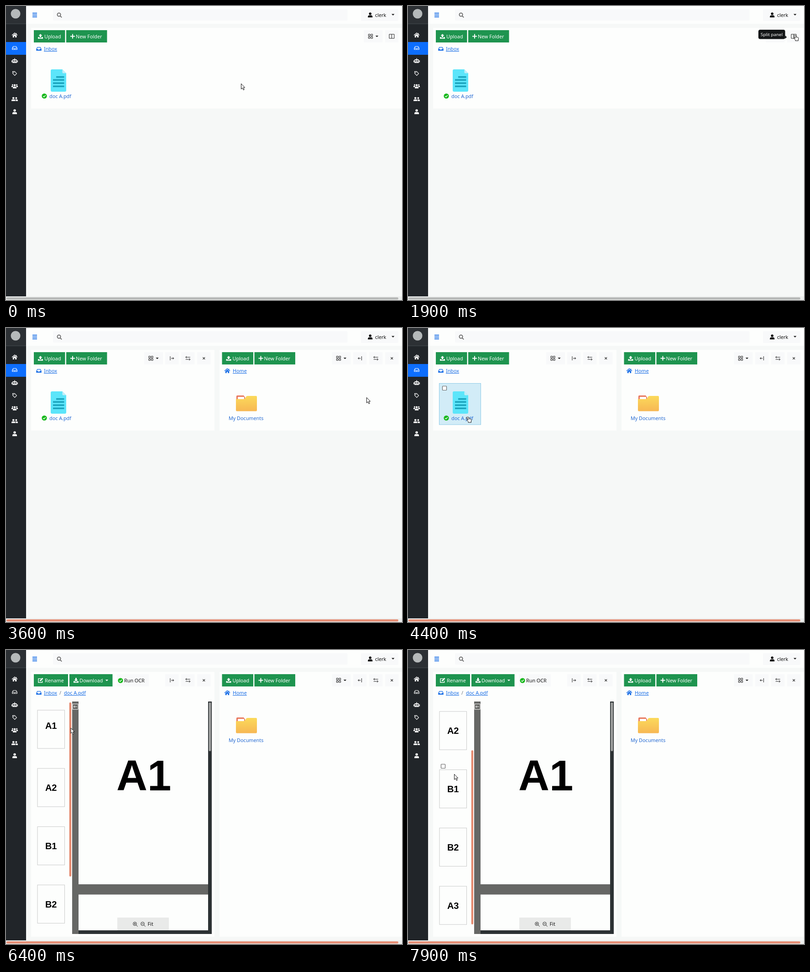
Write an HTML page that moves like this. It is 868 px wide and 645 px high and loops after 8000 ms.

```html
<!DOCTYPE html>
<html lang="en">
<head>
<meta charset="utf-8">
<title>Split panel file browser</title>
<style>
  html, body { margin: 0; width: 100%; height: 100%; overflow: hidden; background: #f6f8f7; }
  svg { display: block; width: 100vw; height: 100vh; }
  text { font: 10.8px "Noto Sans", "Open Sans", sans-serif; white-space: pre; }
  .page { font: bold 20px "Liberation Sans", Arial, sans-serif; text-anchor: middle; }
  .big { font: bold 94px "Liberation Sans", Arial, sans-serif; }
  .tip { font-size: 9.8px; }
  .link { text-decoration: underline; }
</style>
</head>
<body>
<svg id="stage" viewBox="0 0 868 645"></svg>
<script>
const GREEN = '#1e944f', BLUE = '#1b6fe6', DARK = '#212529', PALE = '#f8f9fa';
const SALMON = '#e58a70', ACTIVE = '#e06f4a', WHITE = '#fdfefd';

const rect = (x, y, w, h, fill, more = '') =>
  `<rect x="${x}" y="${y}" width="${w}" height="${h}" fill="${fill}" ${more}/>`;
const text = (x, y, s, fill = '#111', cls = '') =>
  `<text x="${x}" y="${y}" fill="${fill}" class="${cls}">${s}</text>`;
const fill = d => `<path d="${d}" fill="currentColor"/>`;
const line = (d, w = 1) => `<path d="${d}" fill="none" stroke="currentColor" stroke-width="${w}"/>`;
const dot = (x, y, r) => `<circle cx="${x}" cy="${y}" r="${r}" fill="currentColor"/>`;
const group = (id, ...parts) => `<g id="${id}">${parts.join('')}</g>`;

const lens = line('M3.2 0A3.8 3.8 0 1 1 -4.4 0A3.8 3.8 0 1 1 3.2 0M2.2 2.6L5.6 6');
// Every icon is centred on 0,0.
const icons = {
  home: line('M-6 .3L0 -4.8 6 .3', 1.5) + fill('M-4.2 .8L0 -2.8 4.2 .8V5H1.2V2H-1.2V5H-4.2ZM2.8 -4.5H4.3V-1H2.8Z'),
  tray: line('M-5.2 .5L-3.2 -3.2H3.2L5.2 .5V3.5H-5.2ZM-5.2 .5H-2L-1 1.8H1L2 .5H5.2', 1.1),
  inbox: line('M-5.2 .5L-3.2 -3.3H3.2L5.2 .5', 1.2) + fill('M-5.8 .2H-2.4L-1.4 1.8H1.4L2.4 .2H5.8V4H-5.8Z'),
  robot: fill('M-.7 -5.5H.7V-3H3.5Q4.7 -3 4.7 -1.8V5H-4.7V-1.8Q-4.7 -3 -3.5 -3H-.7ZM-7 -.8H-5.4V3.5H-7ZM5.4 -.8H7V3.5H5.4Z') +
    '<path d="M-3 -.7H-1V1.2H-3ZM1 -.7H3V1.2H1ZM-2.8 3H-1.4M-.7 3H.7M1.4 3H2.8" fill="#212529" stroke="#212529" stroke-width=".7"/>',
  tag: line('M-4.4 -4.4H0L4.4 .2 .2 4.4 -4.4 -.2Z', 1.1) + dot(-2.1, -2.1, .9),
  group: dot(0, -2.3, 2.2) + dot(-4.6, -3, 1.5) + dot(4.6, -3, 1.5) +
    fill('M-4 4.8V3Q-4 .7 -1.5 .7H1.5Q4 .7 4 3V4.8ZM-7 2V.3Q-7 -1 -5.5 -1H-3L-4.5 2ZM7 2V.3Q7 -1 5.5 -1H3L4.5 2Z'),
  pair: dot(-2.8, -2, 2.3) + dot(3.4, -2, 2) +
    fill('M-7 4.5V3Q-7 1 -5 1H-1Q1.3 1 1.3 3V4.5ZM2.2 4.5V2.6L1.5 1H5Q7 1 7 3V4.5Z'),
  user: dot(0, -2.9, 2.7) + fill('M-5 5.3V4Q-5 .8 -2 .7H2Q5 .8 5 4V5.3Z'),
  search: line('M2.7 -1A3.6 3.6 0 1 1 -4.5 -1A3.6 3.6 0 1 1 2.7 -1M1.8 1.8L5.2 5.2', 1.8),
  menu: line('M-5 -4H5M-5 0H5M-5 4H5', 1.9),
  upload: fill('M0 -5.3L4 -1.3H1.5V2.3H-1.5V-1.3H-4ZM-5.5 1.8H-2.4V3.4H2.4V1.8H5.5V5.2H-5.5Z'),
  download: fill('M0 2.6L4 -1.4H1.5V-5.3H-1.5V-1.4H-4ZM-5.5 1.8H-2.6L0 4.2 2.6 1.8H5.5V5.2H-5.5Z'),
  plus: line('M-5 0H5M0 -5V5', 2),
  edit: line('M1.5 -3.6H-5V4.8H3.5V1', 1.4) + line('M-1.6 1.6L4.5 -4.5', 2.6),
  grid: line('M-4.6 -4.6H-1V-1H-4.6ZM1 -4.6H4.6V-1H1ZM-4.6 1H-1V4.6H-4.6ZM1 1H4.6V4.6H1Z'),
  caret: fill('M-3.2 -1.5H3.2L0 1.7Z'),
  split: line('M-5.5 -4.5H5.5V4.5H-5.5ZM0 -4.5V4.5'),
  right: line('M-3.8 -4.5V4.5M-1.6 0H4M1.8 -2.3L4 0 1.8 2.3'),
  left: line('M3.8 -4.5V4.5M1.6 0H-4M-1.8 -2.3L-4 0 -1.8 2.3'),
  swap: line('M-5 -2.4H5M-2.6 -4.7L-5 -2.4 -2.6 -.2M-5 2.4H5M2.6 .2L5 2.4 2.6 4.7'),
  close: line('M-2.4 -2.4L2.4 2.4M2.4 -2.4L-2.4 2.4', 1.1),
  back: line('M-6 -6H6V6H-6Z') + line('M3.5 0H-3.5M-1 -2.5L-3.5 0 -1 2.5'),
  check: dot(0, 0, 5.6) + '<path d="M-2.7 .2L-.7 2.1 2.8 -1.8" fill="none" stroke="#fff" stroke-width="1.4"/>',
  zoomIn: lens + line('M-2.6 0H1.4M-.6 -2V2'),
  zoomOut: lens + line('M-2.6 0H1.4'),
  box: '<rect x="-4.5" y="-4.5" width="9" height="9" rx="1" fill="#fff" stroke="#666" stroke-width="1.2"/>'
};
const icon = (name, x, y, color = '#222') =>
  `<g transform="translate(${x} ${y})" color="${color}">${icons[name]}</g>`;

const green = (x, w, name, label, ix, tx) =>
  rect(x, 53, w, 27, GREEN) + icon(name, ix, 66.5, '#fff') + text(tx, 70.5, label, '#fff');
const pale = (x, w, name, ix = x + w / 2) => rect(x, 53, w, 27, PALE) + icon(name, ix, 66.5);
const gridButton = x => pale(x, 41, 'grid', x + 14.5) + icon('caret', x + 28.5, 66.5);
const newButtons = x =>
  green(x, 68.5, 'upload', 'Upload', x + 14.5, x + 23) +
  green(x + 71, 89.5, 'plus', 'New Folder', x + 85, x + 92);
const panelButtons = (x, arrow) =>
  pale(x, 29.5, arrow) + pale(x + 35, 29.5, 'swap') + pale(x + 70, 29.5, 'close');

function sidebar() {
  const names = ['home', 'tray', 'robot', 'tag', 'group', 'pair', 'user'];
  return rect(0, 0, 44, 637, DARK) + rect(0, 0, 44, 38.5, '#2c3034') + rect(0, 38.5, 44, 1, '#4b5055') +
    '<circle cx="21" cy="17" r="10.5" fill="#b5b9ba"/>' +
    rect(0, 79, 44, 28, '#0d6efd', 'id="mark"') +
    names.map((n, i) => icon(n, 19, 64 + 28 * i, '#fff')).join('');
}

function header() {
  return rect(44, 0, 824, 39, WHITE) + icon('menu', 63, 19.7, BLUE) +
    rect(103, 7, 645.5, 25, PALE, 'rx="2"') + icon('search', 117, 20, '#666') +
    rect(778, 7, 82, 26, PALE, 'rx="2"') + icon('user', 798.3, 19.8, '#000') +
    text(809, 23.7, 'clerk') + icon('caret', 848.3, 19, '#111');
}

const fileItem = () =>
  group('hover', rect(68.5, 121.5, 91, 90.5, '#d2ecf7', 'stroke="#8fcbe8"'), icon('box', 80, 132)) +
  '<path d="M101 139H123.5L132 147.5V185Q132 188 129 188H101Q98 188 98 185V142Q98 139 101 139Z" fill="#5ce5fa"/>' +
  '<path d="M123.5 139L132 147.5H125.5Q123.5 147.5 123.5 145.5Z" fill="#c3eef8"/>' +
  rect(110, 154, 17.5, 3.5, '#1aa4bd') +
  [160.5, 167.5, 174.5].map(y => rect(103, y, 24.5, 3.5, '#1aa4bd')).join('') +
  icon('check', 84, 197.5, '#17b81c') + text(95, 201.5, 'doc A.pdf', '#2369d2');

const folderItem = () =>
  '<path d="M505 160V150Q505 148 507 148H521L524 152V160Z" fill="#e8775c"/>' + rect(508, 151, 14, 8, '#fff') +
  '<path d="M504 156H520Q524 156 525.5 152Q526.5 149 530 149H548Q550 149 550 151V180Q550 182.5 548 182.5H506Q504 182.5 504 180Z" fill="url(#gold)"/>' +
  text(488, 201.5, 'My Documents', '#2369d2');

const sheets = [['A1', 41], ['A2', 49.3], ['B1', 49.3], ['B2', 50], ['A3', 49.5]];
function thumbs() {
  return sheets.map(([s, dy], i) => {
    const y = 132 + 127.8 * i;
    return rect(69, y, 59.5, 84, WHITE, 'stroke="#c9caca"') +
      `<g id="label${i}">${text(98.7, y + dy, s, '#000', 'page')}</g>`;
  }).join('');
}

function viewer() {
  return rect(145, 113, 306, 510, '#666765') + rect(159, 615, 292, 8, '#2b3133') +
    rect(443, 113, 8, 510, '#2b3133') + rect(444.7, 115, 4.6, 107, '#a4a6a5', 'rx="2.3"') +
    rect(159, 113, 284, 401, WHITE) + rect(159, 536.5, 284, 78.5, WHITE) +
    group('big', text(242, 308, 'A1', '#000', 'big')) + icon('back', 152, 124.3, '#fff') +
    rect(244, 587, 113, 28, '#e9eae9') + icon('zoomIn', 283, 600.7) + icon('zoomOut', 300, 600.7) +
    text(310.5, 604.8, 'Fit');
}

document.getElementById('stage').innerHTML =
  '<defs><linearGradient id="gold" x2="0" y2="1"><stop stop-color="#fbda5b"/><stop offset="1" stop-color="#f7b753"/></linearGradient>' +
  '<clipPath id="clip"><path d="M55 113H139V615H55Z"/></clipPath></defs>' +
  rect(0, 0, 868, 645, '#f6f8f7') + sidebar() + header() +
  group('single', rect(55, 48, 813, 177, WHITE), gridButton(784.5), pale(831, 29, 'split')) +
  group('split',
    rect(55, 48, 402, 177, WHITE, 'id="leftPanel"'), rect(468, 48, 400, 177, WHITE, 'id="rightPanel"'),
    panelButtons(349, 'right'), newButtons(473.5), gridButton(714.5), panelButtons(761, 'left'),
    group('home', icon('home', 485, 94, BLUE), text(497, 98, 'Home', BLUE, 'link'), folderItem())) +
  icon('inbox', 72, 94, BLUE) + text(83, 98, 'Inbox', BLUE, 'link') +
  group('list', newButtons(61), fileItem()) + group('leftGrid', gridButton(303)) +
  group('doc',
    green(61, 75, 'edit', 'Rename', 76, 85), green(139, 94.5, 'download', 'Download', 153.5, 161),
    icon('caret', 221, 66.5, '#fff'), rect(243, 53, 70, 27, PALE),
    icon('check', 251, 67, '#17b81c'), text(259, 70.5, 'Run OCR'),
    text(117, 98, '/', '#6c757d'), text(127, 98, 'doc A.pdf', BLUE, 'link'),
    group('pages',
      `<g clip-path="url(#clip)">${group('thumbs', thumbs())}</g>`,
      rect(138.7, 115, 4.4, 382, SALMON, 'id="bar" rx="2.2"'), viewer(),
      group('pick', icon('box', 77, 255)))) +
  rect(0, 637, 868, 8, '#eceeed') + rect(1, 639.3, 859, 4.5, '#b4b6b5', 'id="hbar" rx="2.2"') +
  group('tip', rect(768, 52, 58.7, 20.5, '#141617', 'rx="4"'),
    '<path d="M826.5 64.5L830.3 68.3 826.5 72Z" fill="#141617"/>', text(773, 65.8, 'Split panel', '#fff', 'tip')) +
  group('arrow', '<path d="M.5 .5V12.3L3.2 9.8 5.3 14.3 7.2 13.4 5.2 9H8.6Z" fill="#fff" stroke="#111" stroke-linejoin="round"/>') +
  group('hand', '<path d="M.7 2.2Q.7 .7 2 .7H5.6Q6.8 .7 6.8 2V4.2L10.6 4.8Q12 5 12 6.4L11.4 9V12.2H5V10.4L2 7.2Q1.4 6 3 6L4.6 7V3.6H2Q.7 3.6 .7 2.2Z" fill="#fff" stroke="#111" stroke-linejoin="round"/>');

// time, x, y of the pointer tip
const path = [
  [800, 515, 170], [900, 524, 172], [1000, 566, 172], [1100, 635, 162], [1200, 708, 147], [1300, 759, 134],
  [1500, 815, 95], [1600, 835, 72], [1700, 844, 64], [3200, 844, 64], [3400, 828, 101], [3500, 828, 101],
  [3600, 790, 152], [3700, 700, 235], [3800, 590, 292], [3900, 470, 312], [4000, 360, 304], [4100, 270, 278],
  [4200, 200, 244], [4300, 150, 209], [4400, 127, 195], [4800, 127, 195], [5000, 185, 240], [5100, 216, 266],
  [5200, 218, 269], [5400, 218, 269], [5800, 165, 205], [6100, 142, 171], [6300, 142, 171], [6500, 141, 170],
  [6800, 141, 170], [7200, 154, 239], [7500, 163, 272], [7600, 163, 272], [7700, 150, 272], [7800, 118, 272], [7900, 101, 272]
];
const drag = [[6800, 0], [6900, 6], [7000, 22], [7100, 47], [7200, 72], [7300, 90], [7400, 101], [7500, 105]];
const fade = [[4800, 1], [4900, .97], [5000, .85], [5100, .65], [5200, .3], [5300, 0]];
const tipFade = [[1700, .15], [1800, .7], [1900, 1]];

// id, first moment shown, first moment hidden again
const shown = [
  ['single', 0, 3100], ['split', 3100, 8000], ['home', 3300, 8000], ['list', 0, 4800], ['leftGrid', 3100, 4800],
  ['hover', 4300, 4800], ['doc', 4800, 8000], ['pages', 4900, 8000], ['big', 5000, 8000],
  ['label0', 5000, 8000], ['label1', 5000, 8000], ['label2', 5200, 8000], ['label3', 5200, 8000],
  ['tip', 1700, 3100], ['pick', 7800, 8000]
];

const el = id => document.getElementById(id);
const set = (id, name, value) => el(id).setAttribute(name, value);
const within = (t, a, b) => t >= a && t < b;

function at(keys, t) {
  const i = keys.findIndex(k => k[0] > t);
  if (i < 0) return keys[keys.length - 1].slice(1);
  if (i === 0) return keys[0].slice(1);
  const a = keys[i - 1], b = keys[i], p = (t - a[0]) / (b[0] - a[0]);
  return a.slice(1).map((v, n) => v + (b[n + 1] - v) * p);
}

function draw(t) {
  for (const [id, on, off] of shown) set(id, 'display', within(t, on, off) ? 'inline' : 'none');
  const height = t < 4800 ? 177 : 581;
  set('leftPanel', 'height', height);
  set('rightPanel', 'height', height);
  set('mark', 'opacity', at(fade, t)[0]);
  set('tip', 'opacity', at(tipFade, t)[0]);
  set('hbar', 'fill', t < 3000 ? '#b4b6b5' : SALMON);

  const [pull] = at(drag, t);
  set('bar', 'y', 115 + pull);
  set('bar', 'fill', within(t, 6700, 7700) ? ACTIVE : SALMON);
  set('thumbs', 'transform', `translate(0 ${-pull * 1.19})`);

  const [x, y] = at(path, t);
  const hand = within(t, 1800, 3400) || within(t, 4400, 4800);
  set('arrow', 'display', hand ? 'none' : 'inline');
  set('hand', 'display', hand ? 'inline' : 'none');
  set('arrow', 'transform', `translate(${x} ${y})`);
  set('hand', 'transform', `translate(${x} ${y})`);
}

const start = performance.now();
function tick() {
  const t = (performance.now() - start) % 8000;
  draw(Math.floor(t / 100) * 100);
  requestAnimationFrame(tick);
}
tick();
</script>
</body>
</html>
```
